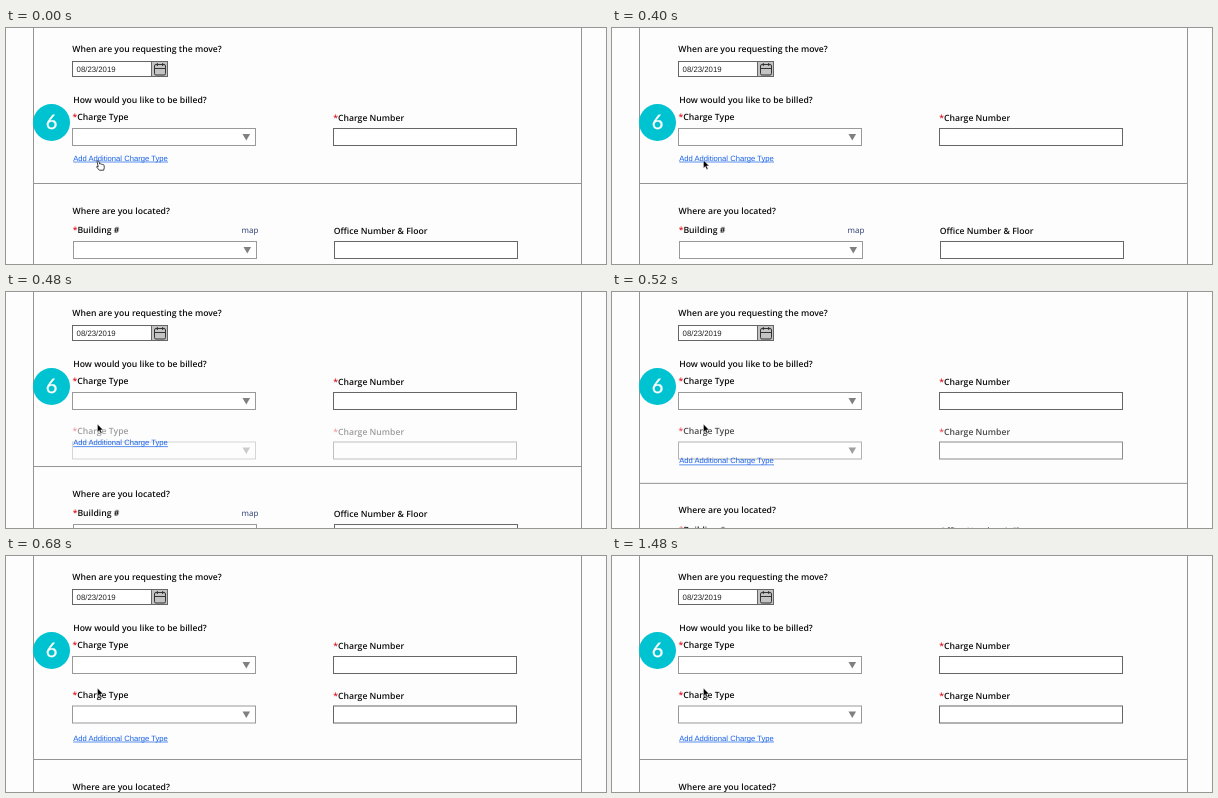
Recreate the animation shown at these times as an HTML page. Size 600x236 px, loop 1.56 s.

```html
<!DOCTYPE html>
<html lang="en">
<head>
<meta charset="utf-8">
<title>Billing form</title>
<style>
  html, body { margin: 0; width: 100%; height: 100%; overflow: hidden; background: #fdfdfd; }
  svg { display: block; text-rendering: geometricPrecision; }
  text { font: 600 8.64px "Open Sans", "Noto Sans", sans-serif; fill: #0c0c0c; }
  .star { fill: #e0101c; }
  .date { font: 7.8px "Liberation Sans", Arial, sans-serif; fill: #222; }
  .link { font: 7.65px "Liberation Sans", Arial, sans-serif; fill: #1560e8; }
  .map { font-weight: 400; font-size: 8px; fill: #26386e; }
  .step { font: 20px Lato, sans-serif; fill: #fff; stroke: #fff; stroke-width: .3; text-anchor: middle; }
  .rule { stroke: #949494; fill: none; }
  .field { stroke: #666; fill: #fff; }
  .select { stroke: #999; fill: #fff; }
</style>
</head>
<body>
<svg width="600" height="236" viewBox="0 0 600 236">
  <defs>
    <g id="select">
      <rect class="select" x="66.5" y="100.5" width="183" height="17"/>
      <path d="M236.5 105.9h7.6l-3.8 6.7z" fill="#808080"/>
    </g>
    <rect id="field" class="field" x="327.5" y="100.5" width="183" height="17"/>
    <g id="row">
      <text x="66.5" y="92"><tspan class="star">*</tspan>Charge Type</text>
      <use href="#select"/>
      <text x="327.3" y="93.2"><tspan class="star">*</tspan>Charge Number</text>
      <use href="#field"/>
    </g>
  </defs>

  <path class="rule" d="M27.5 0V236M575.5 0V236"/>

  <text x="66.3" y="23.8">When are you requesting the move?</text>
  <rect class="field" x="66.5" y="33.5" width="79" height="15"/>
  <text class="date" x="70.6" y="44.2">08/23/2019</text>
  <rect x="145.5" y="33.5" width="16" height="15" fill="#c4c4c4" stroke="#666"/>
  <g fill="none" stroke="#333">
    <rect x="148.5" y="36.5" width="11" height="10.5" rx="1.5"/>
    <path d="M148.5 40.5h11M151.3 35v3M156.7 35v3"/>
  </g>

  <text x="67.3" y="75.2">How would you like to be billed?</text>
  <use href="#row"/>
  <use href="#row" id="added" y="49.5" opacity="0"/>

  <g id="section">
    <path class="rule" d="M27 155.5H576"/>
    <text x="66.6" y="185.6">Where are you located?</text>
    <text x="66.7" y="205.1"><tspan class="star">*</tspan>Building #</text>
    <text class="map" x="235.6" y="205">map</text>
    <use href="#select" x="1" y="113"/>
    <text x="327.8" y="205.9">Office Number &amp; Floor</text>
    <use href="#field" x="1" y="113"/>
  </g>

  <g id="link">
    <text class="link" x="67.2" y="132.6">Add Additional Charge Type</text>
    <path d="M67.2 134H162" stroke="#1560e8" stroke-width=".7"/>
  </g>

  <circle cx="45.5" cy="94.5" r="18.5" fill="#00c3d2"/>
  <text class="step" x="45.5" y="101.4">6</text>

  <path id="arrow" d="M91.4 132v8.2l1.9-1.7 1.4 3 1.4-.6-1.4-3h2.5z" fill="#000" stroke="#fff" stroke-width=".5"/>
  <path id="hand" d="M91 133.2q1-1.1 1.8.2l.9 2.6q1-.6 1.5.2 1-.5 1.5.4 1-.3 1.3.7l.3 2.2-.6 2.7h-4.4l-2.7-3.2q-.2-1.2 1.6-.2z"
        fill="#fff" stroke="#111" stroke-width=".8" stroke-linejoin="round"/>
</svg>
<script>
  const LOOP = 1560, CLICK = 400, SLIDE_START = 406, SLIDE_TIME = 173;
  const [added, section, link, arrow, hand] =
    ["added", "section", "link", "arrow", "hand"].map(id => document.getElementById(id));
  const easeInOut = p => (1 - Math.cos(Math.PI * p)) / 2;
  const moveDown = (el, y) => el.setAttribute("transform", `translate(0 ${y})`);
  const show = (el, on) => el.setAttribute("visibility", on ? "visible" : "hidden");

  function draw(now) {
    const time = now % LOOP;
    const k = easeInOut(Math.min(1, Math.max(0, (time - SLIDE_START) / SLIDE_TIME)));
    added.setAttribute("opacity", k);
    moveDown(section, 48 * k);
    moveDown(link, 52 * k);
    show(hand, time < CLICK);
    show(arrow, time >= CLICK);
  }

  const start = performance.now();
  function tick() {
    draw(performance.now() - start);
    requestAnimationFrame(tick);
  }
  tick();
</script>
</body>
</html>
```
